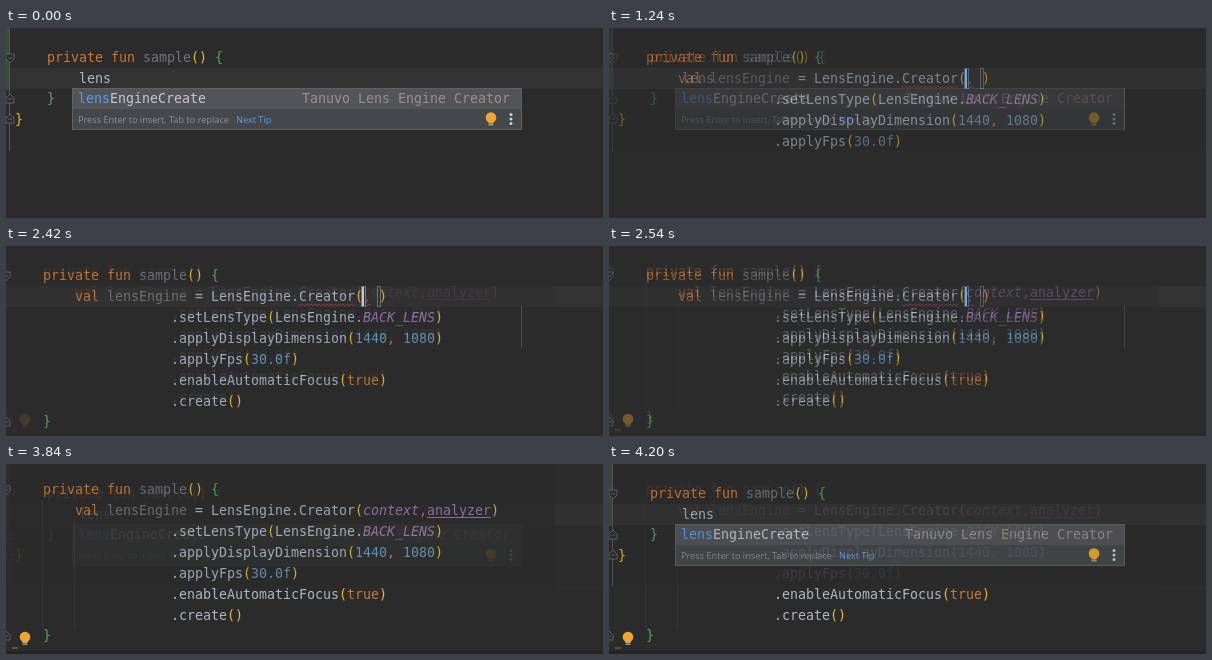
Write an HTML page with a canvas that moves like this. It is 597 px wide and 190 px high and loops after 4.26 s.

```html
<!DOCTYPE html>
<html lang="en">
<head>
<meta charset="utf-8">
<title>Live template</title>
<style>
html, body { margin: 0; width: 100%; height: 100%; overflow: hidden; background: #2b2b2b; }
canvas { display: block; width: 597px; height: 190px; }
</style>
</head>
<body>
<canvas id="stage" width="597" height="190"></canvas>
<script>
const W = 597, H = 190, CELL = 8, LINE = 21, LOOP = 4260, STEP = 60;
const FADE_BOTTOM = 122; // below this the picture switches without a fade
const MONO = '"DejaVu Sans Mono", "Noto Sans Mono", monospace';
const COLORS = {
  k: '#cc7832', // keyword
  t: '#a9b7c6', // plain
  u: '#72737a', // unused
  n: '#6897bb', // number
  p: '#9876aa', // property
  i: '#9876aa', // italic property
  y: '#e8ba36', // round bracket
  g: '#54a857', // brace
  r: '#bc3f3c'  // error
};

function layer(paint) {
  const c = document.createElement('canvas');
  c.width = W;
  c.height = H;
  const g = c.getContext('2d');
  box(g, 0, 0, W, H, '#2b2b2b');
  paint(g);
  return c;
}

function box(g, x, y, w, h, color) {
  g.fillStyle = color;
  g.fillRect(x, y, w, h);
}

function disc(g, x, y, r, color) {
  g.fillStyle = color;
  g.beginPath();
  g.arc(x, y, r, 0, Math.PI * 2);
  g.fill();
}

function label(g, text, x, y, color, font) {
  g.font = font;
  g.fillStyle = color;
  g.fillText(text, x, y);
}

// parts: [style, text, style, text, ...] on a fixed character grid
function code(g, x, y, ...parts) {
  for (let j = 0; j < parts.length; j += 2) {
    const style = parts[j], text = parts[j + 1];
    label(g, text, x, y, COLORS[style] || style, (style === 'i' ? 'italic ' : '') + '13.29px ' + MONO);
    x += text.length * CELL;
  }
}

function wave(g, x, y, w, color) {
  g.strokeStyle = color;
  g.lineWidth = 0.8;
  g.beginPath();
  for (let d = 0; d <= w; d += 2) g.lineTo(x + d, y + (d % 4 ? 1 : -1));
  g.stroke();
}

function fold(g, x, y, dir) {
  g.beginPath();
  g.moveTo(x - 4, y - 4 * dir);
  g.lineTo(x + 4, y - 4 * dir);
  g.lineTo(x + 4, y + dir);
  g.lineTo(x, y + 5 * dir);
  g.lineTo(x - 4, y + dir);
  g.closePath();
  g.fillStyle = '#2b2b2b';
  g.fill();
  g.strokeStyle = '#606366';
  g.lineWidth = 1;
  g.stroke();
  box(g, x - 2, y - 0.5, 4, 1, '#606366');
}

function bulb(g, x, y) {
  disc(g, x, y, 5.3, '#f0a732');
  box(g, x - 2.5, y + 4, 5, 2, '#f0a732');
  box(g, x - 2.5, y + 6.5, 5, 1.5, '#9a9da0');
}

function header(g, x, y) {
  code(g, x, y, 'k', 'private fun ', 'u', 'sample', 'y', '()', 'g', ' {');
}

function chain(g, y) {
  const x = 165;
  code(g, x, y, 't', '.setLensType', 'y', '(', 't', 'LensEngine.', 'i', 'BACK_LENS', 'y', ')');
  code(g, x, y + LINE, 't', '.applyDisplayDimension', 'y', '(', 'n', '1440', 'k', ', ', 'n', '1080', 'y', ')');
  code(g, x, y + 2 * LINE, 't', '.applyFps', 'y', '(', 'n', '30.0f', 'y', ')');
  code(g, x, y + 3 * LINE, 't', '.enableAutomaticFocus', 'y', '(', 'k', 'true', 'y', ')');
  code(g, x, y + 4 * LINE, 't', '.create', 'y', '()');
}

function popup(g) {
  box(g, 66, 60, 450, 42, '#5e6163');
  box(g, 67, 61, 448, 20, '#525458');
  box(g, 67, 81, 448, 20, '#45484a');
  code(g, 72, 75, '#589df6', 'lens', '#c8c8c8', 'EngineCreate');
  code(g, 296, 75, '#97918b', 'Tanuvo Lens Engine Creator');
  const small = '9.2px "Open Sans", "Noto Sans", sans-serif';
  label(g, 'Press Enter to insert, Tab to replace', 72, 95, '#8f9294', small);
  label(g, 'Next Tip', 230, 95, '#589df6', small);
  bulb(g, 485, 89.5);
  for (const y of [86.5, 91, 95.5]) disc(g, 505, y, 1.5, '#d0d2d3');
}

const typed = layer(g => {
  box(g, 0, 40, W, 21, '#323232');
  box(g, 0, 0, 3, 62, '#384c38');
  box(g, 3, 0, 1, 123, '#555758');
  fold(g, 4, 30, 1);
  fold(g, 4, 71, -1);
  fold(g, 4, 91, -1);
  header(g, 41, 34);
  code(g, 73, 55, 't', 'lens');
  code(g, 41, 75, 'g', '}');
  code(g, 9, 96, 'y', '}');
  popup(g);
});

const expanded = layer(g => {
  box(g, 0, 40, W, 21, '#323232');
  box(g, 515, 60, 1, 42, '#515658');
  fold(g, 0, 30, 1);
  fold(g, 0, 176, -1);
  header(g, 37, 34);
  code(g, 69, 55, 'k', 'val ', 'u', 'lensEngine', 't', ' = LensEngine.Creator', 'y', '(', 'r', ', ', 'y', ')');
  wave(g, 293, 59, 56, COLORS.r);
  wave(g, 359, 59, 6, COLORS.r);
  g.lineWidth = 1;
  g.strokeStyle = '#4a88c7';
  g.strokeRect(355.5, 40.5, 4, 20);
  box(g, 356, 41, 2, 19, '#dce4ea');
  g.strokeStyle = '#77797b';
  g.strokeRect(371.5, 40.5, 3, 20);
  chain(g, 76);
  code(g, 37, 180, 'g', '}');
});

const filled = layer(g => {
  box(g, 549, 0, 48, 125, '#2d2d2d');
  box(g, 549, 40, 48, 21, '#323232');
  box(g, 36, 36, 1, 128, '#373737');
  box(g, 68, 57, 1, 107, '#373737');
  box(g, 0, 187, W, 3, '#242424');
  box(g, 6, 183, 6, 2, '#5f5429');
  fold(g, 0, 26, 1);
  fold(g, 0, 172, -1);
  header(g, 37, 30);
  code(g, 69, 51, 'k', 'val ', 'u', 'lensEngine', 't', ' = LensEngine.Creator', 'y', '(',
    'i', 'context', 'k', ',', 'p', 'analyzer', 'y', ')');
  box(g, 421, 53, 64, 1, COLORS.p);
  chain(g, 72);
  code(g, 37, 176, 'g', '}');
  bulb(g, 19, 173);
});

const PHASES = [
  { fade: 1000, steps: 8, from: typed, to: expanded, bottom: FADE_BOTTOM },
  { fade: 2420, steps: 8, from: expanded, to: filled, bottom: H },
  { fade: 3840, steps: 8, from: filled, to: typed, bottom: FADE_BOTTOM }
];

const ctx = document.getElementById('stage').getContext('2d');

function draw(t) {
  let base = typed, blend = null, alpha = 0;
  for (const p of PHASES) {
    if (t < p.fade) break;
    const k = Math.floor((t - p.fade) / STEP) + 1;
    if (k >= p.steps) {
      base = p.to;
      blend = null;
    } else {
      base = p.from;
      blend = p;
      alpha = k / p.steps;
    }
  }
  ctx.globalAlpha = 1;
  ctx.drawImage(base, 0, 0);
  if (blend) {
    ctx.globalAlpha = alpha;
    ctx.drawImage(blend.to, 0, 0, W, blend.bottom, 0, 0, W, blend.bottom);
  }
}

const start = performance.now();
function tick() {
  draw((performance.now() - start) % LOOP);
  requestAnimationFrame(tick);
}
tick();
</script>
</body>
</html>
```
